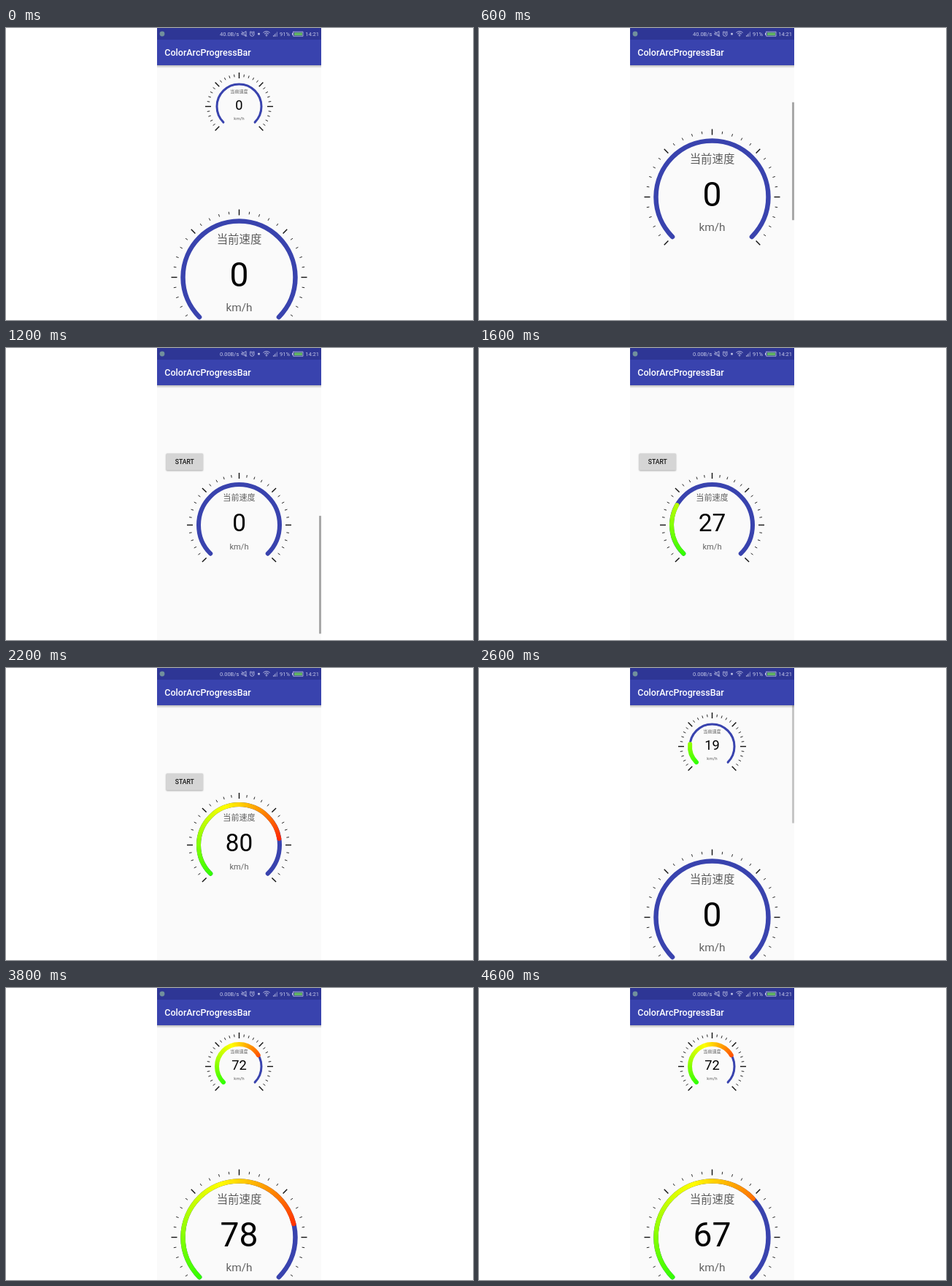
Animation of 640 by 400 pixels, one loop 4800 ms. Source, as an HTML page with a canvas:

```html
<!DOCTYPE html>
<html lang="zh-CN">
<head>
<meta charset="utf-8">
<title>ColorArcProgressBar</title>
<style>
html, body { margin: 0; width: 100%; height: 100%; overflow: hidden; background: #fff; }
canvas { display: block; }
</style>
</head>
<body>
<canvas id="stage" width="640" height="400"></canvas>
<script>
const c = document.getElementById('stage').getContext('2d');
const LOOP = 4800, STEP = 200, LEFT = 207, WIDTH = 225, TOP = 51, CX = 319.5;
const BLUE = '#3943ae', ICON = '#c3c7e8';
const SANS = 'Roboto, "Noto Sans CJK SC", "Noto Sans CJK", sans-serif';
const HANS = '"Noto Sans CJK SC", "Noto Sans CJK", sans-serif';
const rad = deg => deg * Math.PI / 180;

// Each run: start time, duration, start value, end value
const gauges = [
  { y: 107.5, r: 30.5, track: 3, bar: 6, runs: [[2257, 1000, 0, 72]] },
  { y: 341.5, r: 77, track: 6.5, bar: 6.5, runs: [[3150, 900, 0, 95.2], [4150, 1000, 95.2, 29]] },
  { y: 630.5, r: 55.5, track: 6, bar: 6, runs: [[1200, 1000, 0, 80]] }
];
const scrollPath = [[400, 0], [600, 110], [800, 292], [1000, 362], [1200, 388],
  [2200, 388], [2400, 190], [2600, 0]];

function scrollAt(t) {
  let [t0, y0] = scrollPath[0];
  for (const [t1, y1] of scrollPath) {
    if (t < t1) return t <= t0 ? y0 : y0 + (y1 - y0) * (t - t0) / (t1 - t0);
    [t0, y0] = [t1, y1];
  }
  return y0;
}

function valueAt(runs, t) {
  let value = 0;
  for (const [start, length, from, to] of runs) {
    if (t < start) break;
    const p = Math.min(1, (t - start) / length);
    value = from + (to - from) * (1 - Math.cos(Math.PI * p)) / 2;
  }
  return value;
}

function text(s, x, y, font, color, align = 'center') {
  c.font = font;
  c.fillStyle = color;
  c.textAlign = align;
  c.fillText(s, x, y);
}

function rect(x, y, w, h, color) {
  c.fillStyle = color;
  c.fillRect(x, y, w, h);
}

function line(width, color, ...pts) {
  c.lineWidth = width;
  c.strokeStyle = color;
  c.beginPath();
  pts.forEach(([x, y]) => c.lineTo(x, y));
  c.stroke();
}

function arc(x, y, r, from, to, width, style) {
  c.lineWidth = width;
  c.strokeStyle = style;
  c.beginPath();
  c.arc(x, y, r, rad(from), rad(to));
  c.stroke();
}

function drawGauge({ y, r, track, bar, runs }, t) {
  const value = valueAt(runs, t);
  c.lineCap = 'butt';
  for (let i = -15; i <= 15; i++) {
    const long = i % 5 === 0, sin = Math.sin(rad(i * 9)), cos = Math.cos(rad(i * 9));
    const [a, b] = long ? [r + 8, r + 16] : [r + 10.2, r + 13.8];
    line(long ? 1.4 : 0.9, '#111', [CX + a * sin, y - a * cos], [CX + b * sin, y - b * cos]);
  }
  c.lineCap = 'round';
  arc(CX, y, r, 135, 405, track, BLUE);
  if (value > 0) {
    const sweep = c.createConicGradient(rad(130), CX, y);
    [[0, '#2cff00'], [1 / 3, '#ff0'], [2 / 3, '#f00'], [.94, '#f00'], [.94, '#2cff00']]
      .forEach(stop => sweep.addColorStop(...stop));
    arc(CX, y, r, 135, 135 + value * 2.7, bar, sweep);
  }
  c.lineCap = 'butt';
  text('当前速度', CX, y - r * .6, `${r * .2}px ${HANS}`, '#5c5c5c');
  text(Math.floor(value + .1), CX, y + r * .16, `${r * .6}px ${SANS}`, '#000');
  text('km/h', CX, y + r * .6, `${r * .2}px ${SANS}`, '#636363');
}

function drawButton() {
  c.save();
  c.shadowColor = 'rgba(0,0,0,.35)';
  c.shadowBlur = 2;
  c.shadowOffsetY = .8;
  c.fillStyle = '#d5d5d5';
  c.beginPath();
  c.roundRect(219.5, 532.5, 50.5, 23, 1.2);
  c.fill();
  c.restore();
  text('START', 244.8, 547.2, `500 8.6px ${SANS}`, '#161616');
}

function drawStatus(t) {
  const font = `7.5px ${SANS}`;
  rect(LEFT, 0, WIDTH, 16, '#2e3695');
  c.fillStyle = '#71909c';
  c.beginPath();
  c.arc(214, 8, 3.4, 0, 7);
  c.fill();
  text(t < 1200 ? '40.0B/s' : '0.00B/s', 293, 11, font, ICON, 'left');
  text('91%', 375, 11, font, ICON, 'left');
  text('14:21', 429, 11, font, ICON, 'right');
  // muted speaker
  line(.8, ICON, [323, 7], [325, 7], [329, 4.5], [329, 11.5], [325, 9], [323, 9], [323, 7]);
  line(.8, ICON, [323, 4.5], [330, 11.5]);
  // alarm clock
  arc(337.3, 8.3, 2.9, 0, 360, .8, ICON);
  line(.8, ICON, [337.3, 6.5], [337.3, 8.5], [338.7, 8.5]);
  line(.8, ICON, [333.8, 6], [335.6, 4.5]);
  line(.8, ICON, [339, 4.5], [340.8, 6]);
  rect(345.2, 6.8, 2.6, 2.6, ICON);
  // wireless and signal
  [2, 4.3, 6.6].forEach(r => arc(357, 11.2, r, 226, 314, .9, ICON));
  rect(356.4, 10.3, 1.2, 1.2, ICON);
  for (let i = 0; i < 4; i++) {
    rect(366.2 + i * 1.6, 10 - i * 1.6, .9, 1.8 + i * 1.6, i < 2 ? ICON : '#7f86c4');
  }
  // battery
  rect(392, 6.8, 1.3, 2.8, ICON);
  line(.8, ICON, [393.7, 5.2], [407, 5.2], [407, 11.2], [393.7, 11.2], [393.7, 4.8]);
  rect(395, 6.3, 11, 3.9, '#62b562');
}

function draw(t) {
  const scroll = scrollAt(t);
  rect(0, 0, 640, 400, '#fff');
  c.save();
  c.beginPath();
  c.rect(LEFT, 0, WIDTH, 400);
  c.clip();
  rect(LEFT, 0, WIDTH, 400, '#fafafa');

  c.save();
  c.translate(0, -scroll);
  gauges.forEach(g => drawGauge(g, t));
  drawButton();
  c.restore();

  if ((t >= 600 && t <= 1200) || (t >= 2400 && t <= 2600)) {
    rect(429, TOP + scroll * .461, 3, 161.5, t === 2600 ? '#c6c6c6' : '#a8a8a8');
  }
  const shade = c.createLinearGradient(0, TOP, 0, TOP + 4);
  shade.addColorStop(0, 'rgba(0,0,0,.26)');
  shade.addColorStop(1, 'rgba(0,0,0,0)');
  rect(LEFT, TOP, WIDTH, 4, shade);
  rect(LEFT, 16, WIDTH, TOP - 16, BLUE);
  text('ColorArcProgressBar', 217.3, 38.3, `500 12.5px ${SANS}`, '#fff', 'left');
  drawStatus(t);
  c.restore();
}

const begin = performance.now();
function tick() {
  const t = (performance.now() - begin) % LOOP;
  draw(Math.floor(t / STEP) * STEP);
  requestAnimationFrame(tick);
}
tick();
</script>
</body>
</html>
```
